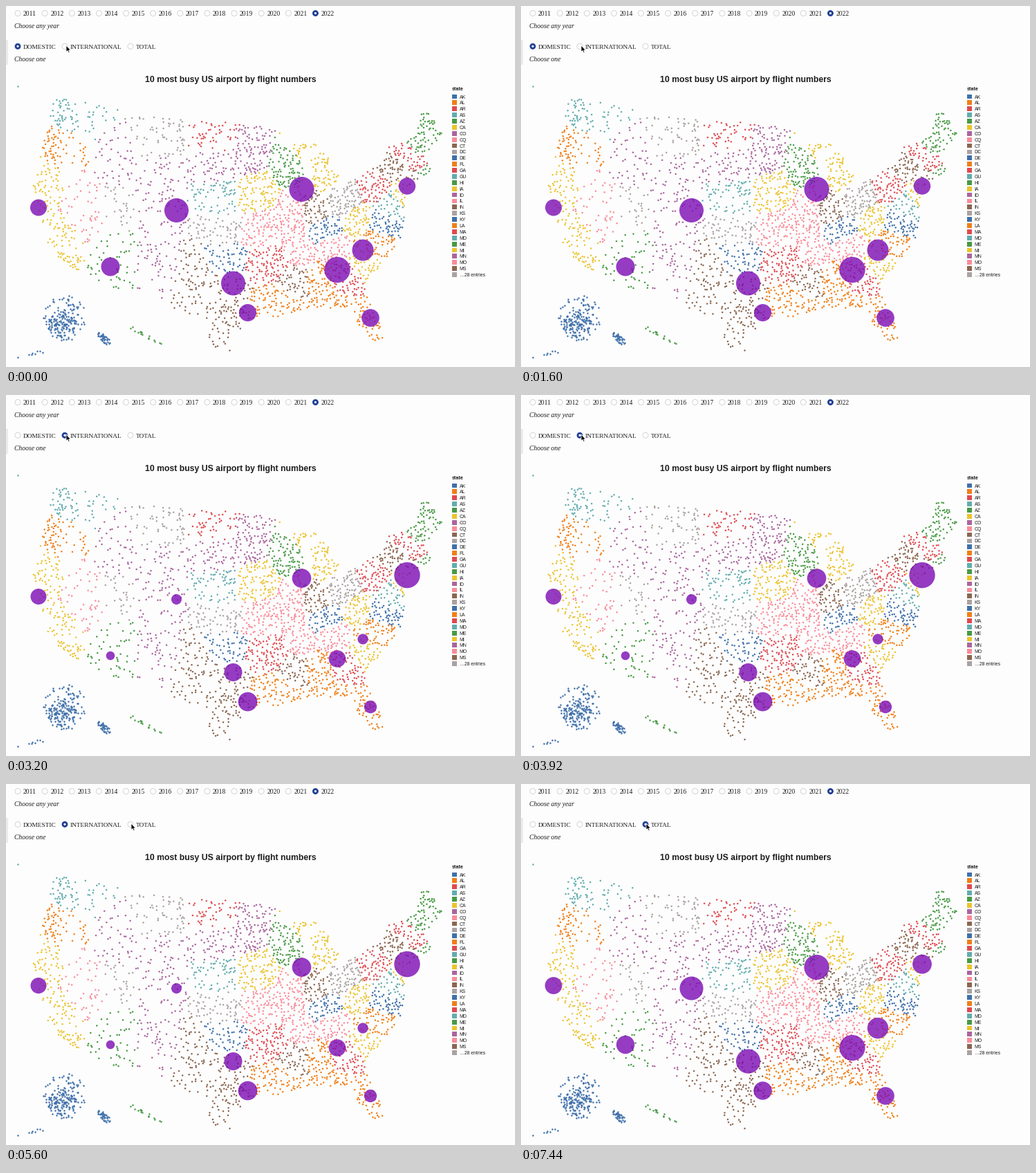
A matplotlib script for the animation above (7520 ms loop, 736 by 522 pixels).

```python
import numpy as np
import matplotlib.pyplot as plt
from matplotlib.animation import FuncAnimation
from matplotlib.patches import Circle, Polygon, Rectangle
from matplotlib.path import Path

W, H, DPI = 736, 522, 100
STEP, LOOP = 80, 7520
PX = 72 / DPI

PAPER, INK, BLUE = "#fdfdfd", "#1c1c1c", "#1f3d94"
PALETTE = ["#3f70aa", "#f07f18", "#df4a50", "#62acae", "#479a44",
           "#ecc32f", "#aa659d", "#fa8c99", "#8b6650", "#aaa2a1"]
CODES = ("AK AL AR AS AZ CA CO CQ CT DC DE FL GA GU HI IA ID IL IN KS KY LA "
         "MA MD ME MI MN MO MS MT NA NC ND NE NH NJ NM NV NY OH OK OR PA PR "
         "RI SC SD TN TX UT VA VI VT WA WI WV WY").split()
COLOR = {code: PALETTE[i % 10] for i, code in enumerate(CODES)}
LEGEND_ROWS = 29
AIRPORTS = 2900

# x, y, domestic radius, international radius
HUBS = [
    (47, 291.5, 12, 11.5), (246.5, 295.5, 17.5, 7.5),
    (151, 377, 13.5, 6.3), (328.5, 401, 17.5, 13),
    (349.5, 443.5, 12.5, 13.8), (427.5, 265, 18, 13.8),
    (580, 260.5, 12.2, 18.7), (516, 353, 15.5, 7.6),
    (479, 381.5, 18.7, 12.3), (527, 451, 12.8, 9.2),
]

# Corners of the mainland, degrees west and north
COAST = [
    (124.6, 48.3), (122.8, 49), (95, 49), (89.8, 47.8), (92, 46.8),
    (84.6, 46.3), (87.6, 45.5), (87.4, 41.7), (86.4, 42.2), (86.2, 44.8),
    (84.8, 45.7), (83.5, 45), (83.6, 43.8), (82.6, 43), (83.3, 41.6),
    (79, 42.8), (76.3, 43.4), (75, 45), (71, 45.2), (69.2, 47.4),
    (68, 47.2), (67.1, 44.8), (70.6, 43), (70, 41.6), (74, 40.6),
    (75.7, 36), (81.2, 32), (81.3, 30.4), (80.1, 26.8), (80.6, 25.2),
    (82.7, 27.8), (83.6, 29.9), (89.3, 30), (91, 29.4), (94, 29.6),
    (97.3, 27.5), (97.3, 26), (99.2, 26.5), (101, 29.6), (103, 29.1),
    (106.4, 31.7), (111, 31.4), (117.1, 32.6), (120.6, 34.6), (123.8, 39.5),
]

rng = np.random.default_rng(12)
fig = plt.figure(figsize=(W / DPI, H / DPI), dpi=DPI, facecolor=PAPER)
ax = fig.add_axes([0, 0, 1, 1])
ax.set_xlim(0, W)
ax.set_ylim(H, 0)
ax.axis("off")


def label(x, y, text, px, family="Liberation Serif", **kw):
    ax.text(x, y, text, fontsize=px * PX, family=family, color=INK, **kw)


def dots(x, y, colors):
    ax.scatter(x, y, s=(2.5 * PX) ** 2, c=colors, linewidths=0)


def project(west, lat):
    """Albers conic projection of the mainland, in pixels."""
    s, t = np.sin(np.radians([29.5, 45.5]))
    n = (s + t) / 2
    rho = np.sqrt(1 - s * s + 2 * n * s - 2 * n * np.sin(np.radians(lat))) / n
    theta = n * np.radians(96 - west)
    return 341.3 + 825.6 * rho * np.sin(theta), 825.6 * rho * np.cos(theta) - 741.6


def density(west, lat):
    """Airports thicken east of the plains and along the Pacific."""
    north = 1 - 0.06 * np.maximum(lat - 41, 0)
    east = 5.2 * north / (1 + np.exp((west - 97) / 3))
    shore = 124 - 0.9 * np.maximum(40 - lat, 0)
    pacific = 4.2 * np.exp(-((shore - west - 1) / 1.6) ** 2)
    return 1.4 + east + pacific


# Each airport belongs to the nearest state centre
centres, owners = [], []


def chain(start, end, codes):
    """Place state centres evenly along a line."""
    codes = codes.split()
    centres.extend(np.linspace(start, end, len(codes)))
    owners.extend(codes)


chain((120.4, 47.4), (120.6, 44), "WA OR")
chain((122.4, 39.9), (118.4, 35.2), "CA CA")
chain((117.3, 39.8), (115.7, 37.4), "NV NV")
chain((113.8, 43.8), (111.7, 34.6), "ID UT AZ")
chain((108.2, 47), (106, 34.8), "MT WY CO NM")
chain((100.3, 47.5), (98.4, 32.2), "ND SD NE KS OK TX")
chain((101.8, 34.6), (99, 30), "TX TX")
chain((94.4, 45.7), (91.6, 31), "MN IA MO AR LA")
chain((89.8, 44.6), (89.3, 40), "WI IL")
chain((86.8, 46.4), (84.8, 43.4), "MI MI")
chain((86.4, 39.9), (78, 40.9), "IN OH PA")
chain((85.3, 37.6), (76.7, 39.2), "KY WV MD")
chain((88.5, 35.8), (84.8, 36), "TN TN")
chain((89.7, 33), (83.5, 33), "MS AL GA")
chain((85.5, 30), (82, 28.4), "FL FL")
chain((78, 37.7), (80.8, 33.8), "VA NC SC")
chain((75.2, 43), (74.2, 40.1), "NY NJ")
chain((73, 43.9), (69, 45.2), "VT NH ME")
chain((71.8, 42.4), (71.5, 41.5), "MA RI")
chain((72.7, 41.5), (72.7, 41.5), "CT")


def mainland(count, gap=2):
    """Random airports by density, never closer than gap pixels."""
    spots = rng.uniform(np.min(COAST, 0), np.max(COAST, 0), (40000, 2))
    spots = spots[Path(COAST).contains_points(spots)]
    spots = spots[rng.random(len(spots)) * 7 < density(*spots.T)]
    xy = np.column_stack(project(*spots.T))
    kept = []
    for i, p in enumerate(xy):
        if not kept or ((xy[kept] - p) ** 2).sum(1).min() > gap * gap:
            kept.append(i)
        if len(kept) == count:
            break
    away = (spots[kept][:, None] - np.array(centres)) * (0.78, 1)
    nearest = (away ** 2).sum(2).argmin(1)
    dots(*xy[kept].T, [COLOR[owners[k]] for k in nearest])


def blob(code, count, x, y, rx, ry, tilt=0):
    """Scatter airports over a tilted ellipse."""
    r, a = np.sqrt(rng.random(count)), rng.uniform(0, 2 * np.pi, count)
    u, v = rx * r * np.cos(a), ry * r * np.sin(a)
    c, s = np.cos(np.radians(tilt)), np.sin(np.radians(tilt))
    dots(x + c * u - s * v, y + s * u + c * v, COLOR[code])


mainland(AIRPORTS)
blob("AK", 135, 85, 452, 31, 34)
blob("AK", 65, 80, 462, 24, 15)
blob("AK", 40, 142, 481, 13, 5, 42)
blob("AK", 8, 38, 502, 25, 3, -12)
blob("HI", 16, 203, 477, 33, 3, 29)
dots([17], [116], COLOR["PR"])

# Legend and title
SANS = "Liberation Sans"
label(324.5, 110.2, "10 most busy US airport by flight numbers", 12.25, SANS,
      weight="bold", ha="center")
label(644.5, 122.3, "state", 7.2, SANS, weight="bold")
for row, code in enumerate(CODES[:LEGEND_ROWS + 1]):
    y = 131 + 8.88 * row
    ax.add_patch(Rectangle((645, y - 3.4), 6.8, 6.8, fc=COLOR[code], lw=0))
    name = code if row < LEGEND_ROWS else "\u202628 entries"
    label(655.5, y + 2.5, name, 6.9, SANS)


# Controls
def radio(x, y):
    outer = ax.add_patch(Circle((x, y), 4, lw=0.8 * PX))
    inner = ax.add_patch(Circle((x, y), 1.6, fc="white", lw=0))

    def choose(on):
        outer.set_facecolor(BLUE if on else "white")
        outer.set_edgecolor(BLUE if on else "#cccccc")
        inner.set_visible(on)

    return choose


for i in range(12):
    x = 17 + 39.13 * i
    radio(x, 10.5)(i == 11)
    label(x + 8, 14, str(2011 + i), 9.7)
label(12.3, 32.3, "Choose any year", 9.65, style="italic")

kinds = []
for x, name in ((17, "DOMESTIC"), (85, "INTERNATIONAL"), (180, "TOTAL")):
    kinds.append(radio(x, 58.3))
    label(x + 8, 61.8, name, 9.4)
label(12.3, 80, "Choose one", 9.65, style="italic")

ax.add_patch(Rectangle((0, 49), 3, 36, fc="#ebebeb", lw=0))
busy = ax.add_patch(Rectangle((3, 96), 2.5, H - 96, fc="#93a6b2", lw=0))

bubbles = [ax.add_patch(Circle((x, y), r, fc="#7b0cb4", alpha=0.8, lw=0,
                               zorder=3))
           for x, y, r, _ in HUBS]

ARROW = np.array([(0, 0), (0, 9.4), (2.1, 7.5), (3.6, 10.8), (5.1, 10.1),
                  (3.7, 7), (6.5, 6.9)])
cursor = ax.add_patch(Polygon(ARROW, fc="black", ec="white", lw=0.8 * PX,
                              zorder=5))

CLICKS = (2160, 5920)
REDRAW, BUSY = 80, 400
MOVE = (3920, 4480)


def radius(home, abroad, mode):
    """Bubble size; the total mixes both areas."""
    return (home, abroad, np.sqrt(0.92 * home ** 2 + 0.16 * abroad ** 2))[mode]


def update(i):
    t = i * STEP
    picked = sum(t >= c for c in CLICKS)
    shown = sum(t >= c + REDRAW for c in CLICKS)
    for k, choose in enumerate(kinds):
        choose(k == picked)
    for bubble, (_, _, home, abroad) in zip(bubbles, HUBS):
        bubble.set_radius(radius(home, abroad, shown))
    busy.set_visible(any(c <= t < c + BUSY for c in CLICKS))
    u = np.clip((t - MOVE[0]) / (MOVE[1] - MOVE[0]), 0, 1)
    cursor.set_xy(ARROW + (87 + 94 * u * u * (3 - 2 * u), 57))
    return []


anim = FuncAnimation(fig, update, frames=LOOP // STEP, interval=STEP,
                     repeat=True, repeat_delay=0, blit=False)
plt.show()
```
